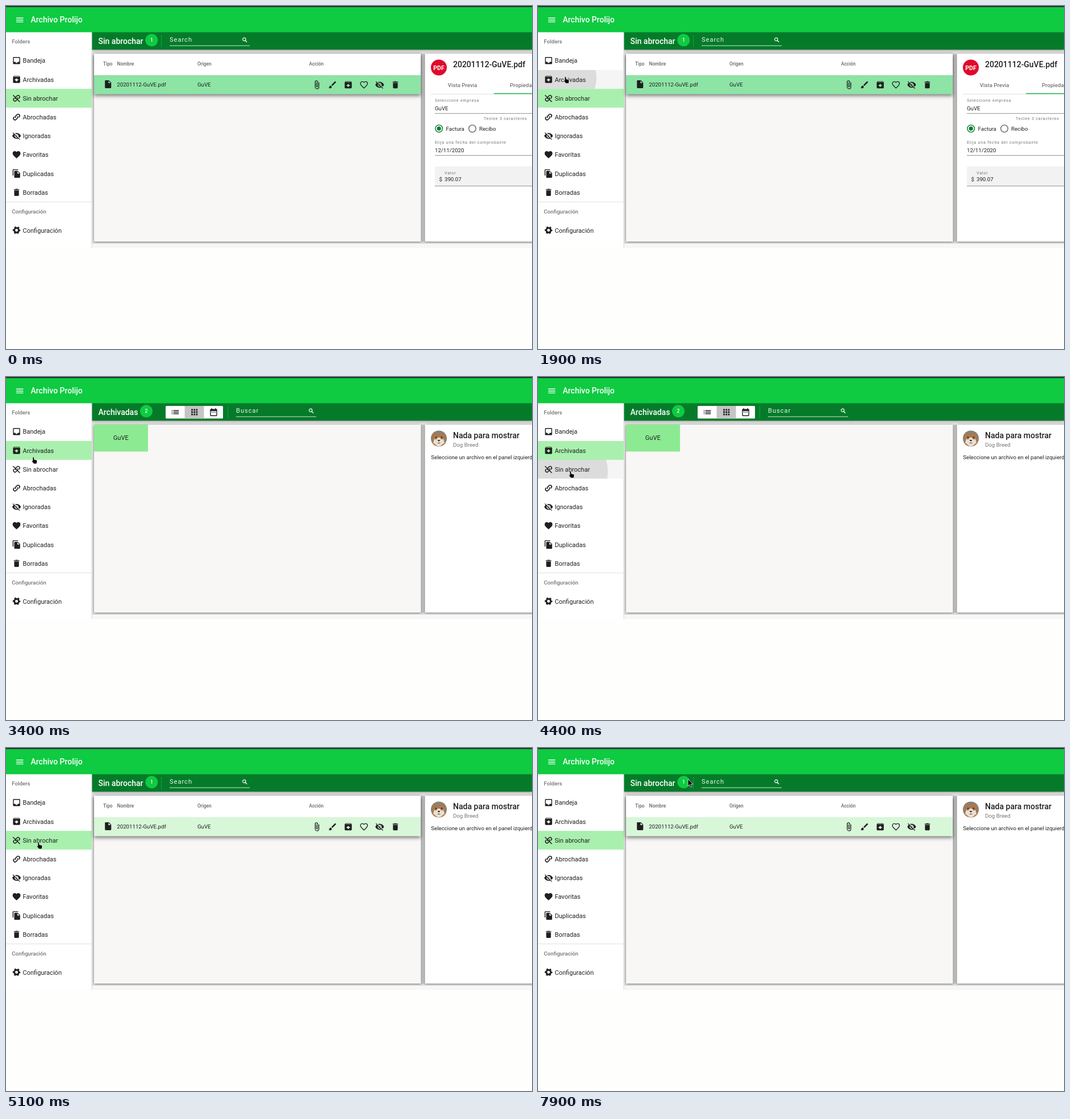
Write an HTML page that moves like this. It is 926x605 px and loops after 8 s.

```html
<!DOCTYPE html>
<html lang="es">
<head>
<meta charset="utf-8">
<title>Archivo Prolijo</title>
<style>
html, body { margin: 0; width: 100%; height: 100%; overflow: hidden; background: #fefefd; }
svg { display: block; font-family: Roboto, sans-serif; }
text { white-space: pre; }
.card { filter: drop-shadow(0 1px 2px rgba(0,0,0,.5)); }
.table { filter: drop-shadow(0 3px 3px rgba(0,0,0,.5)); }
</style>
</head>
<body>
<svg id="stage" width="926" height="605" viewBox="0 0 926 605"></svg>
<script>
const INK = '#1f1f1f', GREY = '#757575', GREEN = '#0ecb41', DEEP = '#057b2a', PICKED = '#a9f0ae';
const COMPANY = 'GuVE', FILE = `20201112-${COMPANY}.pdf`;
const BOX = 'M20.5 5.2l-1.4-1.7Q18.7 3 18 3H6q-.7 0-1.2.5L3.500 5.2Q3 5.800 3 6.500V19q0 2 2 2h14q2 0 2-2V6.500q0-.7-.5-1.300zM5.100 5l.8-1h12l1 1z';
const HEART = 'M12 21.350l-1.450-1.320C5.400 15.360 2 12.280 2 8.500 2 5.420 4.420 3 7.500 3c1.740 0 3.410.81 4.500 2.090C13.090 3.810 14.760 3 16.500 3 19.580 3 22 5.420 22 8.500c0 3.780-3.400 6.860-8.550 11.540z';
const LINK = 'M10 14a3.500 3.500 0 0 1 0-5l3.500-3.500a4 4 0 0 1 5.600 5.600l-1.600 1.600M14 10a3.500 3.500 0 0 1 0 5l-3.500 3.500a4 4 0 0 1-5.600-5.600l1.600-1.600';

const fill = d => `<path fill-rule="evenodd" d="${d}"/>`;
const line = (d, w = 2) => `<path d="${d}" fill="none" stroke="currentColor" stroke-width="${w}"/>`;
const icons = {
  menu: line('M3 7h18M3 12h18M3 17h18'),
  inbox: fill('M5 3h14q2 0 2 2v14q0 2-2 2H5q-2 0-2-2V5q0-2 2-2zM5 5v10h4a3 3 0 0 0 6 0h4V5z'),
  archive: fill(BOX + 'M12 17.500L6.500 12H10v-2h4v2h3.500z'),
  unarchive: fill(BOX + 'M12 9.500l5.500 5.500H14v2h-4v-2H6.500z'),
  link: line(LINK, 2.4),
  unlink: line(LINK, 2.2) + line('M3 4l17.500 17.500', 2.2),
  hidden: fill('M12 7c2.760 0 5 2.240 5 5 0 .65-.13 1.260-.36 1.830l2.920 2.920c1.510-1.260 2.700-2.890 3.430-4.750-1.730-4.390-6-7.500-11-7.500-1.400 0-2.740.25-3.980.7l2.160 2.160C10.740 7.130 11.350 7 12 7zM2 4.270l2.740 2.740C3.080 8.300 1.780 10.020 1 12c1.730 4.390 6 7.500 11 7.500 1.550 0 3.030-.3 4.380-.84L19.730 22 21 20.730 3.270 3zM7.530 9.800l1.550 1.550c-.05.21-.08.43-.08.65 0 1.660 1.340 3 3 3 .22 0 .44-.03.65-.08l1.550 1.550c-.67.33-1.410.53-2.200.53-2.760 0-5-2.240-5-5 0-.79.2-1.530.53-2.200zm4.310-.78l3.150 3.150.02-.16c0-1.660-1.340-3-3-3z'),
  heart: fill(HEART),
  heartLine: `<g transform="translate(1.2 1.2) scale(.9)">${line(HEART + 'z', 2.2)}</g>`,
  copy: fill('M16 1H4q-2 0-2 2v14h2V3h12zM15 5l6 6v10q0 2-2 2H8q-2 0-2-2V7q0-2 2-2zm-1 7h5.500L14 6.500z'),
  trash: fill('M6 19q0 2 2 2h8q2 0 2-2V7H6zM19 4h-3.500l-1-1h-5l-1 1H5v2h14z'),
  gear: `<g fill="none" stroke="currentColor"><circle cx="12" cy="12" r="5.700" stroke-width="4.200"/>
    <circle cx="12" cy="12" r="8.300" stroke-width="3" pathLength="12" stroke-dasharray="1 1" stroke-dashoffset=".5"/></g>`,
  clip: line('M17.250 6v11.500a4.750 4.750 0 0 1-9.500 0V5a3.250 3.250 0 0 1 6.500 0v10.500a1.750 1.750 0 0 1-3.500 0V6', 1.7),
  brush: fill('M7 14q-3 0-3 3 0 2-2 2 1.500 2 4 2a4 4 0 0 0 4-4q0-3-3-3zM20.700 4.600l-1.300-1.300q-.7-.7-1.400 0l-9 9L11.750 15l9-9q.7-.7 0-1.400z'),
  search: '<circle cx="9.500" cy="9.500" r="5.500" fill="none" stroke="currentColor" stroke-width="2.400"/>' + line('M13.500 13.500l6.200 6.200', 2.6),
  file: fill('M6 2Q4 2 4 4v16q0 2 2 2h12q2 0 2-2V8l-6-6zm7 7V3.500L18.500 9z'),
  list: line('M3 8h2m2 0h14M3 12h2m2 0h14M3 16h2m2 0h14'),
  grid: line('M4 6h4m2 0h4m2 0h4M4 12h4m2 0h4m2 0h4M4 18h4m2 0h4m2 0h4', 4),
  date: fill('M19 4h-1V2h-2v2H8V2H6v2H5Q3 4 3 6v14q0 2 2 2h14q2 0 2-2V6q0-2-2-2zm0 16H5V9h14zM7 11h2v2H7zm4 0h2v2h-2zm4 0h2v2h-2z')
};

const icon = (name, x, y, color = INK, size = 16.6) =>
  `<g transform="translate(${x - size / 2} ${y - size / 2}) scale(${size / 24})" fill="${color}" color="${color}">${icons[name]}</g>`;
const rect = (x, y, w, h, color, more = '') =>
  `<rect x="${x}" y="${y}" width="${w}" height="${h}" fill="${color}" ${more}/>`;
const disc = (x, y, r, color, more = '') => `<circle cx="${x}" cy="${y}" r="${r}" fill="${color}" ${more}/>`;
const text = (x, y, s, size = 9.69, color = INK, more = '') =>
  `<text x="${x}" y="${y}" font-size="${size}" fill="${color}" ${more}>${s}</text>`;
const group = (id, body, more = '') => `<g id="${id}" ${more}>${body}</g>`;
const bold = 'font-weight="500"', mid = 'text-anchor="middle"', wide = 'letter-spacing=".72"';

const rowY = i => 79.7 + 33.2 * i;
const folders = [['inbox', 'Bandeja'], ['archive', 'Archivadas'], ['unlink', 'Sin abrochar'], ['link', 'Abrochadas'],
  ['hidden', 'Ignoradas'], ['heart', 'Favoritas'], ['copy', 'Duplicadas'], ['trash', 'Borradas']];
const entry = (name, label, y) => icon(name, 18.6, y) + text(29.5, y + 4.1, label, 11.07);

const toolbar = (title, badgeX, sepX, hint) =>
  text(162.5, 66.5, title, 14, '#fff', bold) + disc(badgeX, 60.3, 11, GREEN) +
  `<path d="M${sepX} 52v20" stroke="${GREEN}" stroke-dasharray="2 1.500"/>` +
  text(sepX + 14.5, 63, hint, 11.07, '#e8f5e9', 'letter-spacing="1"') +
  rect(sepX + 14.5, 69.5, 141, 1, '#d5ead9') + icon('search', sepX + 147, 60, '#fff', 11.5);
const count = (id, x) => `<text id="${id}" x="${x}" y="63.300" font-size="8.500" fill="#fff" ${bold} ${mid}></text>`;

const table = group('rows', rect(155, 84, 575, 38, '#fff') +
    `<rect id="hit" x="155" y="122" width="575" height="33.500"/>`, 'class="table"') +
  [[171, 'Tipo'], [195.5, 'Nombre'], [337, 'Origen'], [533.5, 'Acción']]
    .map(([x, s]) => text(x, 105.2, s, 8.3, '#666', bold)).join('') +
  icon('file', 179.7, 138) + text(195.3, 142, FILE) + text(337, 142, COMPANY) +
  ['clip', 'brush', 'unarchive', 'heartLine', 'hidden', 'trash'].map((n, i) => icon(n, 547.2 + 27.65 * i, 139)).join('');

const form = disc(762, 108.5, 14, '#df0a2b') + text(762, 112.5, 'PDF', 10.5, '#fff', mid + ' font-weight="700"') +
  text(787, 107.7, FILE, 14, INK, bold) +
  text(777.7, 142.5, 'Vista Previa', 9.69, GREY, bold) + text(887, 142.5, 'Propiedades', 9.69, GREY, bold) +
  rect(748, 155, 111, 1, '#e0e0e0') + rect(859, 153.700, 67, 1.700, '#2fb457') +
  text(755, 169.300, 'Seleccione empresa', 7.27, GREY, wide) + text(755, 184, COMPANY) + rect(755, 189, 171, 1, '#949494') +
  text(841, 200.5, 'Teclee 3 caracteres', 7.27, GREY, wide) +
  disc(762.2, 216.2, 6.3, 'none', `stroke="${DEEP}" stroke-width="1.400"`) + disc(762.2, 216.2, 3.6, DEEP) +
  text(774.5, 219.8, 'Factura') + disc(821, 216.2, 6.3, 'none', 'stroke="#666" stroke-width="1.400"') + text(833, 219.8, 'Recibo') +
  text(755, 243.2, 'Elija una fecha del comprobante', 7.27, GREY, wide) + text(755, 258, '12/11/2020') + rect(755, 263, 171, 1, '#949494') +
  rect(755, 283, 180, 35, '#f3f2f2', 'rx="3"') + rect(755, 317, 171, 1, '#949494') +
  text(772, 297, 'Valor', 7.27, GREY, wide) + text(762.5, 309.300, '$') + text(772, 309.300, '390.07');

const dog = `<g clip-path="url(#avatar)">${rect(748, 94, 28, 29, '#858279')}
  <path d="M752 96l6 4h8l6-4 1 11 2 16h-26l2-16z" fill="#a9794f"/>
  <path d="M754 109q4 3 5-1 3-3 6 0 1 4 5 1l2 7-10 8-10-8z" fill="#eadfd2"/>
  ${disc(757, 106.5, 1.2, '#29211d')}${disc(767, 106.5, 1.2, '#29211d')}
  <path d="M759.500 111h5l-2.500 3zM759 116q3 2 6 0" fill="#29211d"/></g>`;
const empty = dog + text(787, 107.7, 'Nada para mostrar', 14, INK, bold) + text(787, 123, 'Dog Breed', 9.69, GREY) +
  text(748.3, 145.3, 'Seleccione un archivo en el panel izquierdo');

stage.innerHTML = `<defs>
  <clipPath id="avatar">${disc(762, 108.5, 14, '#000')}</clipPath>
  <clipPath id="pressed"><rect id="pressedRow" width="151" height="33.200"/></clipPath>
  <clipPath id="main">${rect(151, 77, 775, 341.5, '#000')}</clipPath></defs>` +
  rect(151, 77, 775, 350, '#f7f7f7') +
  `<g clip-path="url(#main)">${rect(151, 77, 775, 341.5, '#e4e4e4')}${rect(730, 84, 8, 332, '#c9c9c9')}
    ${rect(155, 84, 575.5, 331.5, '#f8f7f6', 'class="card"')}${rect(737.5, 84, 200, 331.5, '#fff', 'class="card"')}</g>` +
  rect(151, 418, 775, 1, '#d0d0d0') +
  `<rect x="151" y="46" width="775" height="31" fill="${DEEP}" style="filter:drop-shadow(0 1px 2px #0006)"/>` +
  rect(0, 46, 151, 381, '#fff') + rect(150.5, 46, 1, 381, '#dcdcdc') +
  rect(0, 0, 926, 46.300, GREEN) + rect(0, 0, 926, 2, '#26352c') +
  icon('menu', 24.2, 24.7, '#fff') + text(43.5, 29, 'Archivo Prolijo', 14, '#fff', bold) +
  text(10.3, 66.3, 'Folders', 9.69, GREY, bold) + text(10.3, 365.8, 'Configuración', 9.69, GREY, bold) +
  rect(0, 345, 151, 1, '#e0e0e0') +
  `<rect id="hover" width="151" height="33.200" fill="#f5f5f5"/><rect id="picked" width="151" height="33.200" fill="${PICKED}"/>
   <g clip-path="url(#pressed)"><circle id="ripple"/></g>` +
  folders.map(([n, s], i) => entry(n, s, rowY(i) + 16.6)).join('') + entry('gear', 'Configuración', 395.5) +
  group('pending', toolbar('Sin abrochar', 256.3, 273.5, 'Search') + count('pendingCount', 256.3)) +
  group('archived', toolbar('Archivadas', 247, 390.5, 'Buscar') + count('archivedCount', 247) +
    rect(281, 51, 101, 22.300, '#fff', 'rx="1.500"') + rect(314.5, 51, 34, 22.300, '#c5c5c5') +
    icon('list', 298, 62) + icon('grid', 331.7, 62) + icon('date', 365.5, 62)) +
  group('table', table) +
  group('tile', rect(155, 84, 95, 47.5, '#8ceb92') + text(202.3, 111.3, COMPANY, 11.07, INK, mid)) +
  group('loading', rect(155, 84, 575, 2.700, '#c9efce') + '<rect id="bar" y="84" height="2.700" fill="#2fb457"/>') +
  group('form', form) + group('empty', empty) +
  group('hand', '<path d="M3 0q1.500 0 1.500 1.500V4.500l4 1q1.500.5 1.200 2L9 12H4L0 7.200q1-1.200 2 0V1.500Q2 0 3 0z" stroke="#fff" stroke-width=".6"/>') +
  group('arrow', '<path d="M0 0v12l3-2.500 2 4.500 2-1-2-4.300h4z" stroke="#fff" stroke-width=".7"/>');

const el = id => document.getElementById(id);
const show = (id, on) => el(id).setAttribute('visibility', on ? 'visible' : 'hidden');
const set = (id, attrs) => { for (const k in attrs) el(id).setAttribute(k, attrs[k]); };
const clamp = v => Math.max(0, Math.min(1, v));

// Pointer stops: time, x, y
const stops = [[1100, 11, 74], [1200, 11, 74], [1400, 42, 124], [1500, 42, 124], [1600, 45, 124.5], [3300, 45, 124.5],
  [3400, 45, 141], [3800, 54, 166], [7100, 54, 166], [7700, 930, 57]];

function pointer(t) {
  if (t >= 7900) return [264, 55];
  const i = stops.findIndex(s => s[0] > t);
  if (i < 1) return [-50, 0];
  const [t0, x0, y0] = stops[i - 1], [t1, x1, y1] = stops[i], k = (t - t0) / (t1 - t0);
  return [x0 + (x1 - x0) * k, y0 + (y1 - y0) * k];
}

function draw(t) {
  const archive = t >= 2100 && t < 4700, later = t >= 4700;
  const loadStart = later ? 4700 : 2100, loadEnd = later ? 4900 : 2600;
  const loading = t >= loadStart && t < loadEnd;

  set('picked', { y: rowY(archive ? 1 : 2) });
  set('hover', { y: rowY(t < 3000 ? 1 : 2) });
  show('hover', t >= 1400 && t < 2100 || t >= 3600 && t < 4700);

  const second = t >= 4000;
  const fade = second ? clamp((5100 - t) / 400) : clamp((2700 - t) / 400);
  set('pressedRow', { y: rowY(second ? 2 : 1) });
  set('ripple', {
    cx: second ? 57 : 46, cy: second ? 167 : 127, opacity: .1 * fade,
    r: Math.max(0, second ? (t - 4100) * .22 : t < 1900 ? 0 : 57 + (t - 1900) / 2)
  });

  show('archived', archive);
  show('pending', !archive);
  el('archivedCount').textContent = loading ? 0 : 2;
  el('pendingCount').textContent = loading ? 0 : 1;
  show('tile', archive && !loading);
  show('table', !archive && !loading);
  set('hit', { fill: later ? '#d7f7d8' : '#8de4a5' });
  show('form', t < 2100);
  show('empty', t >= 2100);

  show('loading', loading);
  const head = (t - loadStart) * .835, tail = Math.max(0, head - 167);
  set('bar', { x: 155 + tail, width: Math.min(575, head) - tail });

  const [x, y] = pointer(t), hand = t >= 1300 && t < 7300;
  show('hand', hand);
  show('arrow', !hand);
  set(hand ? 'hand' : 'arrow', { transform: `translate(${x} ${y})` });
}

const start = performance.now();
function tick() {
  const t = (performance.now() - start) % 8000;
  draw(Math.floor(t / 100) * 100);
  requestAnimationFrame(tick);
}
tick();
</script>
</body>
</html>
```
